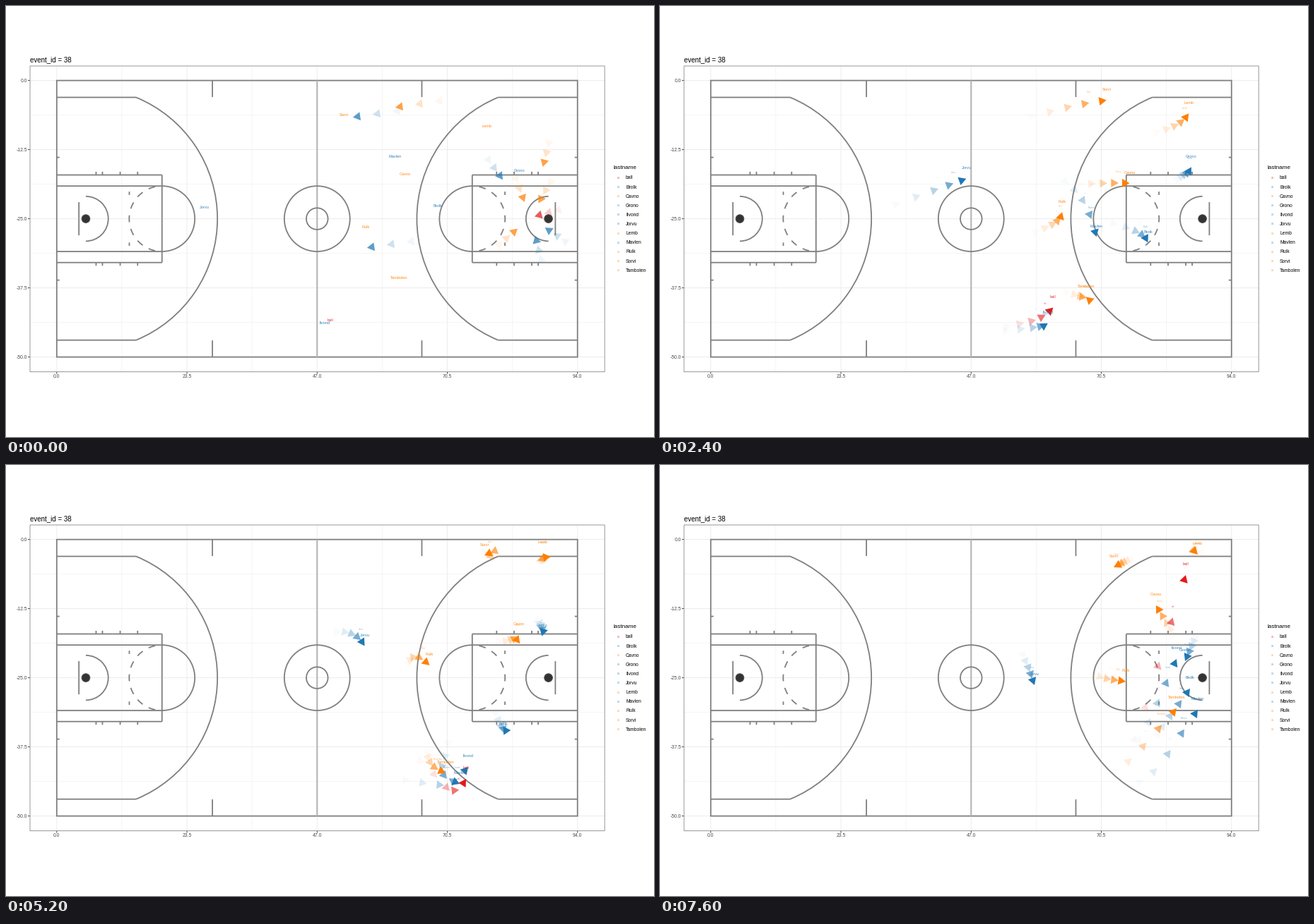
A matplotlib script that plays this animation: 917x611 px, repeating every 8 s.

```python
import numpy as np
import matplotlib.pyplot as plt
from matplotlib.animation import FuncAnimation
from matplotlib.patches import Arc, Circle, Polygon, Rectangle

W, H, DPI = 917, 611, 100
PT = 72 / DPI
FRAMES, INTERVAL = 20, 400
FT = 7.84                       # pixels per foot
LEFT, TOP = 71.8, 105.6
RIGHT, BOTTOM = LEFT + 94 * FT, TOP + 50 * FT
MID_X, MID_Y = (LEFT + RIGHT) / 2, (TOP + BOTTOM) / 2
RED, BLUE, ORANGE = "#e31a1c", "#1f78b4", "#ff7f00"
GREY, GRID, INK = "#7f7f7f", "#ebebeb", "#333333"
KEYS = np.array([0, 4, 9, 11, 15, 19])
WAKE = 5

plt.rcParams["font.family"] = "Liberation Sans"
plt.rcParams["path.snap"] = False
fig = plt.figure(figsize=(W / DPI, H / DPI), dpi=DPI, facecolor="white")
ax = fig.add_axes([0, 0, 1, 1])
ax.set_xlim(0, W)
ax.set_ylim(H, 0)
ax.axis("off")


def line(x0, y0, x1, y1, color=GREY, width=1.8, z=2):
    ax.plot([x0, x1], [y0, y1], color=color, lw=width * PT, zorder=z,
            solid_capstyle="butt")


def text(x, y, label, size, color="black", ha="left", **style):
    return ax.text(x, y + 0.36 * size, label, fontsize=size * PT, color=color,
                   ha=ha, va="baseline", **style)


def arc(x, y, radius, start, end, style="-"):
    ax.add_patch(Arc((x, y), 2 * radius, 2 * radius, theta1=start, theta2=end,
                     color=GREY, lw=1.8 * PT, ls=style, zorder=2))


def box(x, y, w, h, color=GREY, width=1.8, z=2):
    ax.add_patch(Rectangle((x, y), w, h, fill=False, ec=color, lw=width * PT, zorder=z))


def draw_axes():
    x0, y0, w, h = 34, 85, 813.2, 433.6
    for i in np.arange(0, 4.5, 0.5):
        major = i % 1 == 0
        x, y = LEFT + i * 23.5 * FT, TOP + i * 12.5 * FT
        width = 0.9 if major else 0.45
        line(x, y0, x, y0 + h, GRID, width, 0)
        line(x0, y, x0 + w, y, GRID, width, 0)
        if major:
            line(x, y0 + h, x, y0 + h + 3, INK, 0.9)
            line(x0 - 3, y, x0, y, INK, 0.9)
            text(x, 525, f"{23.5 * i:.1f}", 6.9, "#4d4d4d", "center")
            text(30, y, f"{0 - 12.5 * i:.1f}", 6.9, "#4d4d4d", "right")
    box(x0, y0, w, h, "#8c8c8c", 0.9, 3)
    text(x0, 75.5, "event_id = 38", 9.8)


def draw_half(side):
    """Draw one end of the court, measured in feet from its baseline."""
    def at(feet):
        return LEFT + feet * FT if side < 0 else RIGHT - feet * FT

    def mirrored(x0, y0, x1, y1):
        """A line and its reflection about the long axis."""
        for sign in (-1, 1):
            line(at(x0), MID_Y + sign * y0 * FT, at(x1), MID_Y + sign * y1 * FT)

    def half_circle(feet, radius, inner=False, style="-"):
        start = -90 if (side < 0) != inner else 90
        arc(at(feet), MID_Y, radius * FT, start, start + 180, style)

    hoop, three, corner = 5.25, 23.75, 21.95
    reach = np.arcsin(corner / three)
    mirrored(0, corner, hoop + three * np.cos(reach), corner)
    facing = 0 if side < 0 else 180
    arc(at(hoop), MID_Y, three * FT, facing - np.degrees(reach), facing + np.degrees(reach))

    lane = 19
    mirrored(0, 7.92, lane, 7.92)
    mirrored(0, 5.92, lane, 5.92)
    mirrored(lane, 0, lane, 7.92)
    half_circle(lane, 5.92)
    dash = np.pi * 5.92 * FT / 15 / 1.8
    half_circle(lane, 5.92, inner=True, style=(dash, (dash, dash)))
    for feet in (7.1, 8.25, 11.45, 14.6):
        mirrored(feet, 7.92, feet, 8.5)
    mirrored(13.1, 4.3, 13.1, 4.9)
    mirrored(0, 11.1, 0.5, 11.1)
    mirrored(28.1, 22, 28.1, 25)

    half_circle(hoop, 4.05)
    mirrored(4, 0, 4, 3)
    ax.add_patch(Circle((at(hoop), MID_Y), 5.8, fc=INK, ec="#4d4d4d", lw=0.7, zorder=8))


def draw_court():
    box(LEFT, TOP, RIGHT - LEFT, BOTTOM - TOP)
    line(MID_X, TOP, MID_X, BOTTOM, "#b8b8b8", 2.2)
    for radius in (5.92, 1.95):
        arc(MID_X, MID_Y, radius * FT, 0, 360)
    draw_half(-1)
    draw_half(1)


def smooth(values):
    """Cubic Hermite curve through the key points, sampled at every frame."""
    slope = np.gradient(values, KEYS)
    t = np.arange(FRAMES)
    i = np.clip(np.searchsorted(KEYS, t, "right") - 1, 0, len(KEYS) - 2)
    h = KEYS[i + 1] - KEYS[i]
    u = (t - KEYS[i]) / h
    return ((1 + 2 * u) * (1 - u) ** 2 * values[i]
            + u * (1 - u) ** 2 * h * slope[i]
            + u ** 2 * (3 - 2 * u) * values[i + 1]
            + u ** 2 * (u - 1) * h * slope[i + 1])


class Mover:
    def __init__(self, name, color, *key_points):
        self.name, self.color = name, color
        self.path = np.column_stack([smooth(v) for v in np.array(key_points, float).T])

    def heading(self, k):
        return self.path[k] - self.path[k - 1]


movers = [
    Mover("ball", RED, (459, 461), (532, 445), (592, 422),
          (628, 462), (673, 383), (744, 156)),
    Mover("Brolk", BLUE, (611, 299), (679, 322), (695, 358),
          (704, 376), (707, 376), (750, 317)),
    Mover("Cavno", ORANGE, (565, 254), (633, 251), (704, 250),
          (721, 245), (722, 234), (702, 199)),
    Mover("Grono", BLUE, (727, 249), (747, 235), (756, 226),
          (759, 236), (755, 250), (743, 278)),
    Mover("Ilvond", BLUE, (451, 465), (534, 455), (572, 447),
          (620, 454), (681, 383), (731, 275)),
    Mover("Jorvu", BLUE, (281, 301), (394, 259), (475, 236),
          (495, 242), (516, 275), (530, 312)),
    Mover("Lemb", ORANGE, (681, 186), (734, 167), (758, 132),
          (760, 127), (759, 125), (761, 127)),
    Mover("Mavlen", BLUE, (551, 229), (602, 281), (625, 401),
          (615, 434), (685, 447), (761, 347)),
    Mover("Rulk", ORANGE, (509, 329), (561, 306), (573, 275),
          (583, 272), (619, 299), (659, 307)),
    Mover("Sorvi", ORANGE, (478, 170), (583, 142), (684, 126),
          (689, 123), (660, 136), (642, 145)),
    Mover("Tambolen", ORANGE, (556, 401), (601, 413), (597, 414),
          (604, 427), (650, 431), (731, 345)),
]

# Marks still fading from the preceding play.
carried = {
    BLUE: [(496, 157), (516, 342), (700, 242), (750, 331), (767, 317)],
    ORANGE: [(556, 143), (761, 223), (732, 273), (756, 275), (720, 319)],
    RED: [(753, 297)],
}


def draw_legend():
    text(859.5, 228, "lastname", 8.2)
    for i, mover in enumerate(movers):
        y = 243 + 13.13 * i
        text(866.5, y, "a", 5, mover.color, "center", alpha=0.75)
        text(877, y, mover.name, 6.8)


def arrow(tip, heading, color, alpha, z):
    """Equilateral triangle with its tip at the given point."""
    ahead = heading / (np.hypot(*heading) or 1)
    side = np.array([-ahead[1], ahead[0]])
    base = tip - 10.5 * ahead
    return ax.add_patch(Polygon([tip, base + 6 * side, base - 6 * side], fc=color,
                                ec="none", alpha=alpha, zorder=z))


def carried_step(place):
    """Runners upcourt came from the right, the others from around the paint."""
    if place[0] < 600:
        return np.array([28.0, -4.0])
    away = place - np.array([742, 300])
    return 14 * away / np.hypot(*away)


def draw_carried(frame):
    marks = []
    for color, places in carried.items():
        for place in np.array(places, float):
            step = carried_step(place)
            ahead = -step / np.hypot(*step)
            for age in range(3 - frame):
                alpha = 0.72 * 0.3 ** age * 0.42 ** frame
                tip = place + age * step + 5.25 * ahead
                marks.append(arrow(tip, ahead, color, alpha, 4 - 0.1 * age))
    return marks


draw_axes()
draw_court()
draw_legend()
live = []


def update(frame):
    while live:
        live.pop().remove()
    live.extend(draw_carried(frame))
    for lag in range(min(WAKE, frame + 1)):
        k, z = frame - lag, 6 - 0.2 * lag
        alpha = (1 - lag / WAKE) ** 2.2
        for mover in movers:
            x, y = mover.path[k]
            if k > 0:
                live.append(arrow(mover.path[k], mover.heading(k), mover.color, alpha, z))
            if lag < 3:
                live.append(text(x, y - 2 * FT, mover.name, 5.7 * 0.5 ** lag,
                                 mover.color, "center", alpha=0.9 * alpha, zorder=z + 0.1))
    return live


anim = FuncAnimation(fig, update, frames=FRAMES, interval=INTERVAL,
                     init_func=lambda: [], repeat=True, repeat_delay=0, blit=False)
plt.show()
```
